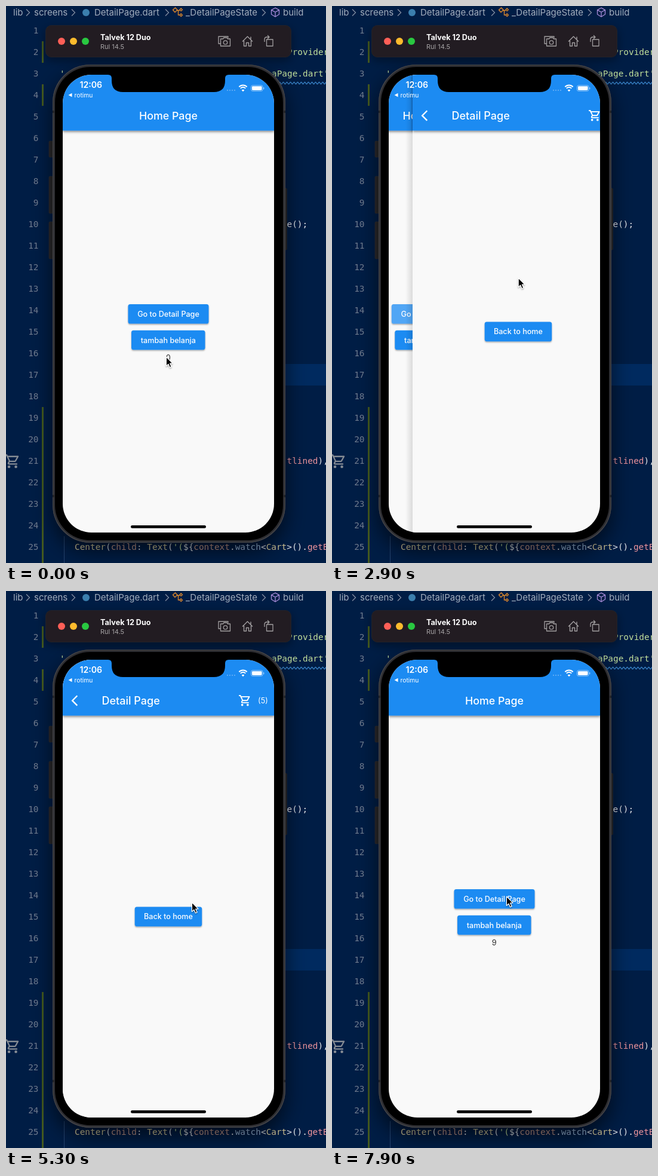
An HTML page that plays this animation: 536 by 932 pixels, repeating every 8 s.

```html
<!DOCTYPE html>
<html lang="en">
<head>
<meta charset="utf-8">
<title>Shopping counter demo</title>
<style>
  html, body { margin: 0; width: 100%; height: 100%; overflow: hidden; background: #001d45; }
  svg { display: block; width: 536px; height: 932px; }
  text { font-family: Inter, "Open Sans", sans-serif; white-space: pre; }
  .mono { font-family: "DejaVu Sans Mono", "Liberation Mono", monospace; }
</style>
</head>
<body>
<svg id="stage" viewBox="0 0 536 932" xmlns="http://www.w3.org/2000/svg"></svg>
<script>
const LOOP = 8000, STEP = 100;
const BLUE = '#1e8bf2', PAPER = '#f9f9f9';
const SCREEN = { x: 95, y: 115, w: 354, h: 766 };

const buttons = {
  go: { x: 204.5, y: 499, w: 135, h: 32.5, label: 'Go to Detail Page' },
  add: { x: 210, y: 542.7, w: 123.5, h: 32.5, label: 'tambah belanja' },
  back: { x: 215.7, y: 528.5, w: 112.5, h: 32.7, label: 'Back to home' }
};

// Each tap: button, release time, touch point.
const taps = [
  ...[800, 1080, 1360, 1640, 1947].map(up => ({ on: 'add', up, x: 277, y: 557 })),
  { on: 'go', up: 2700, x: 284, y: 516 },
  { on: 'back', up: 5500, x: 304, y: 543 },
  ...[6620, 6800, 6975, 7260].map(up => ({ on: 'add', up, x: 309, y: 567 }))
];
const PRESS = 90;
const PUSH = 2700, POP = 5500, SLIDE = 450;

// Pointer stops: time, x, y.
const pointer = [
  [0, 268, 587], [200, 268, 587], [600, 277, 555], [2050, 277, 555],
  [2400, 284, 515], [2750, 284, 515], [3300, 436, 186], [4500, 436, 186],
  [5300, 311, 521], [5420, 304, 541], [5560, 304, 541], [5900, 331, 571],
  [6200, 331, 571], [6300, 316, 567], [6400, 309, 567], [7450, 309, 566],
  [7600, 326, 547], [7850, 292, 511], [8000, 292, 511]
];

const clamp = v => Math.min(1, Math.max(0, v));
const ramp = (t, from, span) => clamp((t - from) / span);
const smooth = v => v * v * (3 - 2 * v);

function bezier(x1, y1, x2, y2) {
  const at = (a, b, s) => 3 * a * s * (1 - s) ** 2 + 3 * b * s * s * (1 - s) + s ** 3;
  return x => {
    let lo = 0, hi = 1;
    for (let i = 0; i < 24; i++) {
      const mid = (lo + hi) / 2;
      if (at(x1, x2, mid) < x) lo = mid; else hi = mid;
    }
    return at(y1, y2, (lo + hi) / 2);
  };
}
const slideEase = bezier(.35, .91, .33, .97);
const rippleEase = bezier(.25, .1, .25, 1);

// Text placed by the middle of its capital letters.
const text = (x, mid, size, fill, str, extra = '') =>
  `<text x="${x}" y="${(mid + size * .364).toFixed(2)}" font-size="${size}" fill="${fill}" ${extra}>${str}</text>`;
const rect = (x, y, w, h, fill, r = 0, extra = '') =>
  `<rect x="${x}" y="${y}" width="${w}" height="${h}" rx="${r}" fill="${fill}" ${extra}/>`;
const line = (d, stroke, width, extra = '') =>
  `<path d="${d}" fill="none" stroke="${stroke}" stroke-width="${width}" ${extra}/>`;
const dot = (x, y, r, fill) => `<circle cx="${x}" cy="${y}" r="${r}" fill="${fill}"/>`;
const shadow = (id, dy, blur, alpha) =>
  `<filter id="${id}" x="-30%" y="-60%" width="160%" height="240%">
    <feDropShadow dx="0" dy="${dy}" stdDeviation="${blur}" flood-color="#000" flood-opacity="${alpha}"/></filter>`;

const cart = (x, y, scale, fill) => `<path transform="translate(${x} ${y}) scale(${scale})" fill="${fill}"
  d="M15.55 13c.75 0 1.41-.41 1.75-1.03l3.58-6.49c.37-.66-.11-1.48-.87-1.48H5.21l-.94-2H1v2h2l3.6 7.59-1.35 2.44C4.52 15.37 5.48 17 7 17h12v-2H7l1.1-2h7.45zM6.16 6h12.15l-2.76 5H8.53L6.16 6zM7 18a2 2 0 1 0 0 4a2 2 0 0 0 0-4zM17 18a2 2 0 1 0 0 4a2 2 0 0 0 0-4z"/>`;

function codeLine(x, row, ...parts) {
  const spans = parts.map(([fill, str]) => `<tspan fill="${fill}">${str}</tspan>`).join('');
  return text(x, 5 + 36 * row, 14.4, '#fff', spans, 'class="mono"');
}

function breadcrumb() {
  const grey = '#a3adbd';
  const label = (x, str) => text(x, 10.5, 15, grey, str);
  const chevrons = [37, 113, 270, 432]
    .map(x => line(`M${x - 3} 5.5l5.5 5.5l-5.5 5.5`, '#8792a5', 1.2)).join('');
  return label(12, 'lib') + label(47, 'screens') + label(148, 'DetailPage.dart') +
    label(301, '_DetailPageState') + label(464, 'build') + chevrons +
    dot(134, 11, 6, '#3b7fae') +
    line('M279.5 6.5l4-3.5l3.5 3.5l-4 4zM286 7.5h5M288.5 7.5v7.5h3M291 6l2.2-2l2.2 2.2l-2.2 2.2zM291 15l2.2-2l2.2 2.2l-2.2 2.2z', '#e08a2c', 1.3) +
    line('M451 3.2l6.5 3.4v7.4l-6.5 4l-6.5-4v-7.4zM444.5 6.6l6.5 3.6l6.5-3.6M451 10.2v7.6', '#a98bd8', 1.3);
}

function editor() {
  let out = rect(0, 0, 536, 932, '#001d45') + rect(100, 599, 436, 36, '#002a5f');
  for (const [y, h] of [[59, 36], [131, 36], [671, 261]]) out += rect(60, y, 3, h, '#43591f');
  for (let n = 1; n <= 25; n++)
    out += text(54.5, 5 + 36 * n, 14.4, '#717c8f', n, 'class="mono" text-anchor="end"');
  const green = '#c3e09c', pink = '#ee949c', white = '#e4e6ea', sand = '#d9cc9b', sky = '#a3bfe2';
  let wave = 'M457 129';
  for (let x = 457; x < 536; x += 6) wave += 'q1.5 -3.4 3 0t3 0';
  out += codeLine(471, 2, [green, 'Provider']) +
    codeLine(90, 3, [green, "'"]) + codeLine(445, 3, [green, "aPage.dart'"]) +
    line(wave, '#3f8ed6', 1.2) +
    codeLine(470.5, 10, [white, 'e();']) +
    codeLine(470.5, 21, [pink, 'tlined'], [white, '),']) +
    rect(97, 887, 1, 45, '#27446f') +
    codeLine(115, 25, [sand, 'Center'], [white, '('], ['#c99a8c', 'child'], [white, ': '], [sand, 'Text'],
      [white, '('], [green, "'("], [white, '${'], ['#c99a8c', 'context'], [white, '.'], [sky, 'watch'],
      [white, '&lt;'], [sand, 'Cart'], [white, '&gt;().'], [pink, 'getB']);
  return out + breadcrumb() + cart(-3, 748, 1.15, '#858b94');
}

function toolbar() {
  const g = '#a19ea0';
  return rect(66.5, 32.5, 411, 53, '#211d20', 9.5, 'stroke="#242329" filter="url(#barShade)"') +
    dot(93, 59, 6, '#fe5f57') + dot(113, 59, 6, '#fdbb2d') + dot(133, 59, 6, '#29c840') +
    text(158, 52.5, 12.6, '#fff', 'Talvek 12 Duo', 'font-weight="700"') +
    text(158, 67.5, 11, '#a5a2a4', 'Rul 14.5') +
    line('M359 63h-3v-12h16v2.5M359.5 55h4l1.5-2h5l1.5 2h4v12h-16z', g, 1.3, 'stroke-linejoin="round"') +
    `<circle cx="367.5" cy="61" r="3.2" fill="none" stroke="${g}" stroke-width="1.3"/>` +
    line('M396 59.5l8.5-8.5l8.5 8.5M398.5 58v9h4v-5.5h4v5.5h4v-9M410 56v-4.5', g, 1.4, 'stroke-linejoin="round"') +
    line('M436.5 56h10.5v11h-10.5zM433 60v-4q0-4 4-4h3.5M438 49l3 3l-3 3', g, 1.3, 'stroke-linejoin="round"');
}

function phoneBody() {
  const side = (x, y, w, h) => rect(x, y, w, h, '#2a292b', 1.5, 'stroke="#363437" stroke-width=".6"');
  return side(72, 226, 7, 27) + side(72, 285, 7, 62) + side(72, 361, 7, 62) + side(465, 305, 5.5, 103) +
    rect(78, 98, 390, 800, '#2e2e31', 63, 'filter="url(#phoneShade)"') +
    rect(78.7, 98.7, 388.6, 798.6, 'none', 62.4, 'stroke="#47474a" stroke-width="1.2"') +
    rect(82, 102, 382, 792, '#000', 59) +
    [[78, 175], [464.5, 175], [78, 818], [464.5, 818]].map(([x, y]) => rect(x, y, 3.5, 4, '#242427')).join('');
}

function button(id) {
  const b = buttons[id];
  const box = (fill, extra) => rect(b.x, b.y, b.w, b.h, fill, 3.6, extra);
  const rings = taps.map((tap, i) => tap.on === id ? `<circle id="ring${i}" fill="#fff"/>` : '').join('');
  return `<clipPath id="${id}Clip">${box('#000')}</clipPath>` +
    box(BLUE, 'filter="url(#rest)"') + box(BLUE, `id="${id}Lift" filter="url(#lifted)"`) +
    `<g clip-path="url(#${id}Clip)">${box('#fff', `id="${id}Glow"`)}${rings}</g>` +
    text(b.x + b.w / 2, b.y + b.h / 2, 12.6, '#fff', b.label, 'text-anchor="middle" font-weight="500"');
}

const page = (id, content) => `<g id="${id}">` +
  rect(SCREEN.x, SCREEN.y, SCREEN.w, SCREEN.h, PAPER) +
  rect(SCREEN.x, SCREEN.y, SCREEN.w, 93.5, BLUE, 0, 'filter="url(#header)"') + content + '</g>';

function homePage() {
  return page('home',
    text(272, 183.3, 17.8, '#fff', 'Home Page', 'text-anchor="middle" font-weight="500"') +
    button('go') + button('add') +
    text(271.8, 588.2, 12.8, '#2b2b2b', '0', 'id="count" text-anchor="middle"'));
}

function detailPage() {
  return page('detail',
    rect(83, 115, 12, 766, 'url(#edge)') +
    line('M119.3 175.2l-8.2 8.2l8.2 8.2', '#fff', 2.3) +
    text(160.5, 183.3, 18, '#fff', 'Detail Page', 'font-weight="500"') +
    cart(389.2, 172.2, .92, '#fff') +
    text(430.4, 183.3, 12.6, '#fff', '(5)', 'text-anchor="middle"') +
    button('back'));
}

function statusBar() {
  const arc = r => {
    const d = r * .72;
    return line(`M${397 - d} ${142 - d}A${r} ${r} 0 0 1 ${397 + d} ${142 - d}`, '#fff', 2);
  };
  return text(142.3, 131.5, 14.2, '#fff', '12:06', 'text-anchor="middle" font-weight="600"') +
    '<path d="M104.5 149l6-3.3v6.6z" fill="#fff"/>' + text(114.5, 149, 10.3, '#fff', 'rotimu') +
    [371, 375, 379, 383].map(x => dot(x, 141, 1.1, '#6cb2f6')).join('') +
    arc(9.2) + arc(5.8) + '<path d="M397 143.2l-2.4-2.5q2.4-2 4.8 0z" fill="#fff"/>' +
    rect(410.5, 132.8, 19.5, 9.6, 'none', 2.6, 'stroke="#8fc5f9" stroke-width="1"') +
    rect(412, 134.2, 16.5, 6.8, '#fff', 1.4) + rect(431, 136, 1.4, 3.4, '#8fc5f9', .7);
}

const notch = `<path d="M171 114v1q6 0 6 6v4q0 19 19 19h152q19 0 19-19v-4q0-6 6-6v-1z" fill="#000"/>`;
const cursor = `<g id="cursor"><path filter="url(#rest)" fill="#000" stroke="#fff" stroke-width="1.2"
  stroke-linejoin="round" d="M.4 .2V15.4L3.9 12.2L6.4 17.8L9 16.6L6.6 11.1L11 10.8Z"/></g>`;

document.getElementById('stage').innerHTML = `<defs>
  ${shadow('rest', 1.4, 1.1, .38)}${shadow('lifted', 3.5, 2.6, .42)}${shadow('header', 1.8, 1.9, .5)}
  ${shadow('barShade', 5, 8, .4)}${shadow('phoneShade', 14, 17, .6)}
  <clipPath id="screen">${rect(SCREEN.x, SCREEN.y, SCREEN.w, SCREEN.h, '#000', 48)}</clipPath>
  <linearGradient id="edge"><stop offset="0" stop-opacity="0"/><stop offset="1" stop-opacity=".12"/></linearGradient>
  </defs>` + editor() + phoneBody() + toolbar() +
  `<g clip-path="url(#screen)">${homePage()}${detailPage()}${statusBar()}${notch}</g>` +
  rect(209, 869, 126, 4.8, '#000', 2.4) + cursor;

const el = id => document.getElementById(id);
const set = (id, attrs) => { for (const k in attrs) el(id).setAttribute(k, attrs[k]); };

function pointerAt(t) {
  const i = Math.max(1, pointer.findIndex(p => p[0] > t));
  const [t0, x0, y0] = pointer[i - 1], [t1, x1, y1] = pointer[i];
  const k = smooth((t - t0) / (t1 - t0));
  return [x0 + (x1 - x0) * k, y0 + (y1 - y0) * k];
}

function drawTaps(t) {
  const glow = { go: 0, add: 0, back: 0 };
  taps.forEach((tap, i) => {
    const b = buttons[tap.on], down = tap.up - PRESS;
    const reach = Math.hypot(b.w, b.h) / 2;
    const grow = rippleEase(ramp(t, tap.up, 225));
    set('ring' + i, {
      cx: tap.x + (b.x + b.w / 2 - tap.x) * grow,
      cy: tap.y + (b.y + b.h / 2 - tap.y) * grow,
      r: reach * .3 + (reach * .7 + 5) * grow,
      opacity: .23 * ramp(t, down, 75) * (1 - ramp(t, tap.up + 220, 150))
    });
    glow[tap.on] = Math.max(glow[tap.on], ramp(t, down, 60) * (1 - ramp(t, tap.up + 50, 90)));
  });
  for (const id in glow) {
    set(id + 'Glow', { opacity: .14 * glow[id] });
    set(id + 'Lift', { opacity: glow[id] });
  }
}

function draw(t) {
  const open = slideEase(ramp(t, PUSH, SLIDE)) - slideEase(ramp(t, POP, SLIDE));
  set('home', { transform: `translate(${-SCREEN.w / 3 * open} 0)` });
  set('detail', {
    transform: `translate(${SCREEN.w * (1 - open)} 0)`,
    visibility: open > .0005 ? 'visible' : 'hidden'
  });
  el('count').textContent = taps.filter(tap => tap.on === 'add' && tap.up <= t).length;
  drawTaps(t);
  const [x, y] = pointerAt(t);
  set('cursor', { transform: `translate(${x} ${y})` });
}

const start = performance.now();
function tick() {
  const t = (performance.now() - start) % LOOP;
  draw(Math.floor(t / STEP) * STEP);
  requestAnimationFrame(tick);
}
tick();
</script>
</body>
</html>
```
